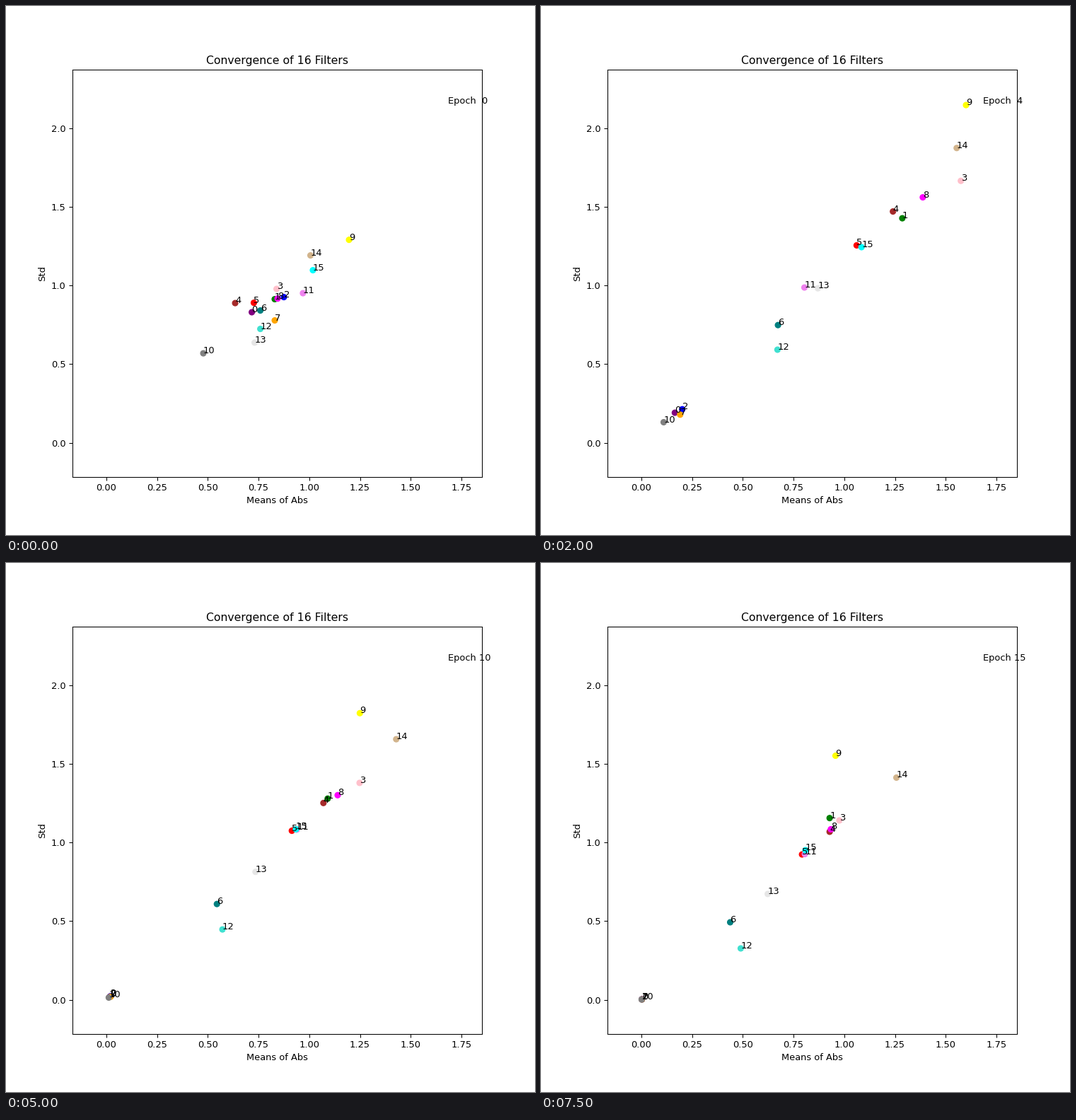
Recreate the animation shown at these times as a matplotlib script. Size 748 px wide and 748 px high, loop 8 s.

```python
import numpy as np
import matplotlib.pyplot as plt
from matplotlib.animation import FuncAnimation

LAST = 15
EPOCHS = np.arange(LAST + 1)
X_MAX, Y_MAX = 1.6833, 2.1565
DECAY = 0.693


def fade(x, y):
    """A filter that dies out: geometric decay to the origin."""
    return np.outer(DECAY ** EPOCHS, [x, y])


def drift(start, *turns, end):
    """A filter that survives: even drift through (epoch, x, y) turns."""
    e, x, y = zip((0, *start), *turns, (LAST, *end))
    return np.column_stack([np.interp(EPOCHS, e, x), np.interp(EPOCHS, e, y)])


filters = [
    ("purple", fade(0.717, 0.830)),
    ("green", drift((0.83, 0.913), (4, 1.286, 1.427), end=(0.928, 1.155))),
    ("blue", fade(0.875, 0.926)),
    ("pink", drift((0.839, 0.978), (2, X_MAX, 1.76), end=(0.976, 1.14))),
    ("brown", drift((0.635, 0.888), (4, 1.24, 1.47), end=(0.928, 1.068))),
    ("red", drift((0.727, 0.89), (2, 1.11, 1.315), end=(0.792, 0.924))),
    ("teal", drift((0.759, 0.841), end=(0.438, 0.493))),
    ("orange", fade(0.830, 0.778)),
    ("magenta", drift((0.844, 0.917), (2, 1.342, 1.479), (4, 1.387, 1.56),
                      end=(0.934, 1.084))),
    ("yellow", drift((1.196, 1.29), (2, 1.238, 1.87), (4, 1.6, 2.146),
                     end=(0.957, 1.551))),
    ("gray", fade(0.478, 0.569)),
    ("violet", drift((0.969, 0.951), (2, 0.661, 0.861), (7, 1.018, 1.176),
                     end=(0.806, 0.926))),
    ("turquoise", drift((0.759, 0.724), (2, 0.542, 0.479), (4, 0.671, 0.592),
                        end=(0.49, 0.327))),
    ("#e6e6e6", drift((0.731, 0.637), (4, 0.87, 0.982), end=(0.623, 0.673))),
    ("tan", drift((1.006, 1.191), (2, 1.462, 1.82), (5, 1.6, 1.9),
                  end=(1.257, 1.412))),
    ("cyan", drift((1.018, 1.097), (3, 1.11, 1.27), end=(0.809, 0.951))),
]
colors, tracks = zip(*filters)
tracks = np.array(tracks)

fig, ax = plt.subplots(figsize=(8, 8), dpi=93.5)
ax.set_xlim(-0.1 * X_MAX, 1.1 * X_MAX)
ax.set_ylim(-0.1 * Y_MAX, 1.1 * Y_MAX)
ax.set_title("Convergence of 16 Filters")
ax.set_xlabel("Means of Abs")
ax.set_ylabel("Std")

dots = ax.scatter(*tracks[:, 0].T, c=colors)
labels = [ax.text(0, 0, str(i)) for i in range(len(tracks))]
counter = ax.text(X_MAX, Y_MAX, "")


def update(epoch):
    points = tracks[:, epoch]
    dots.set_offsets(points)
    for label, point in zip(labels, points):
        label.set_position(point)
    counter.set_text(f"Epoch {epoch:2d}")
    return [dots, counter, *labels]


anim = FuncAnimation(fig, update, frames=len(EPOCHS), interval=500,
                     repeat=True, repeat_delay=0)
plt.show()
```
